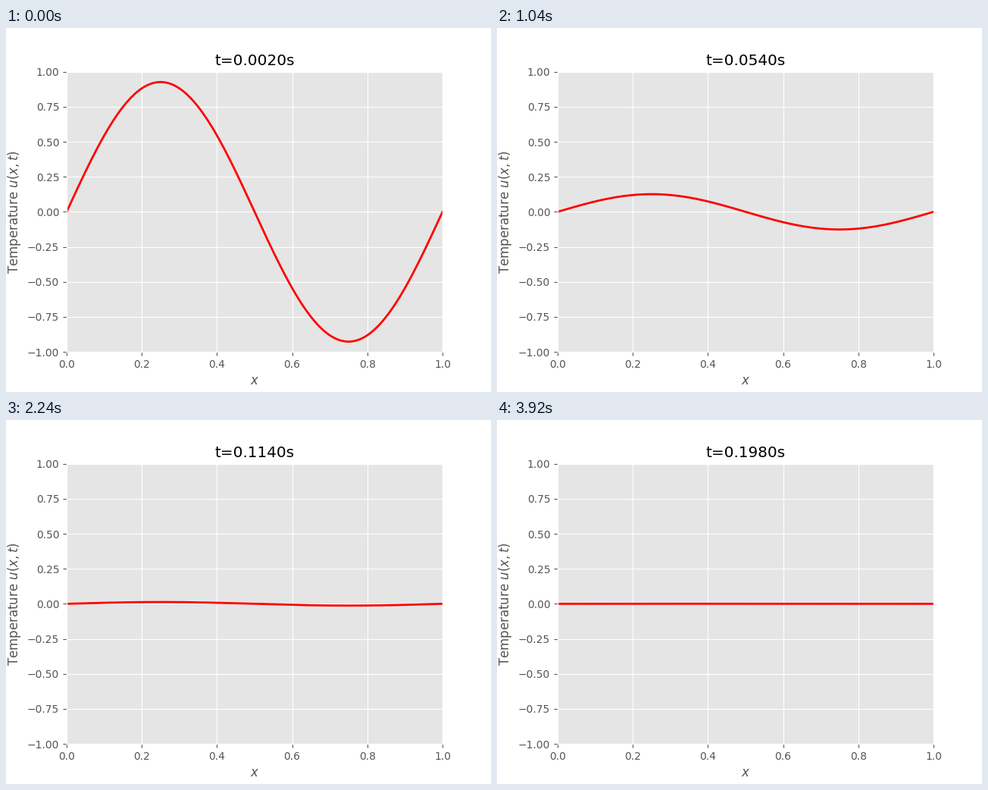
Animation of 640x480 px, one loop 3.96 s. Source, as a matplotlib script:

```python
import numpy as np
import matplotlib.pyplot as plt
from matplotlib.animation import FuncAnimation

plt.style.use("ggplot")

FRAMES = 99
DT = 0.002
# Decay of the first full sine mode per implicit Euler step
DECAY = 1 / (1 + (2 * np.pi) ** 2 * 0.2 / FRAMES)

x = np.linspace(0, 1, 201)
mode = np.sin(2 * np.pi * x)

fig, ax = plt.subplots(figsize=(6.4, 4.8), dpi=100)
line, = ax.plot(x, mode, color="red", lw=2)
ax.set_xlim(0, 1)
ax.set_ylim(-1, 1)
ax.set_xlabel("$x$")
ax.set_ylabel("Temperature $u(x,t)$")
title = ax.set_title("")


def update(i):
    step = i + 1
    line.set_ydata(DECAY ** step * mode)
    title.set_text(f"t={step * DT:.4f}s")
    return line, title


anim = FuncAnimation(fig, update, frames=FRAMES, interval=40, repeat=True)
plt.show()
```
